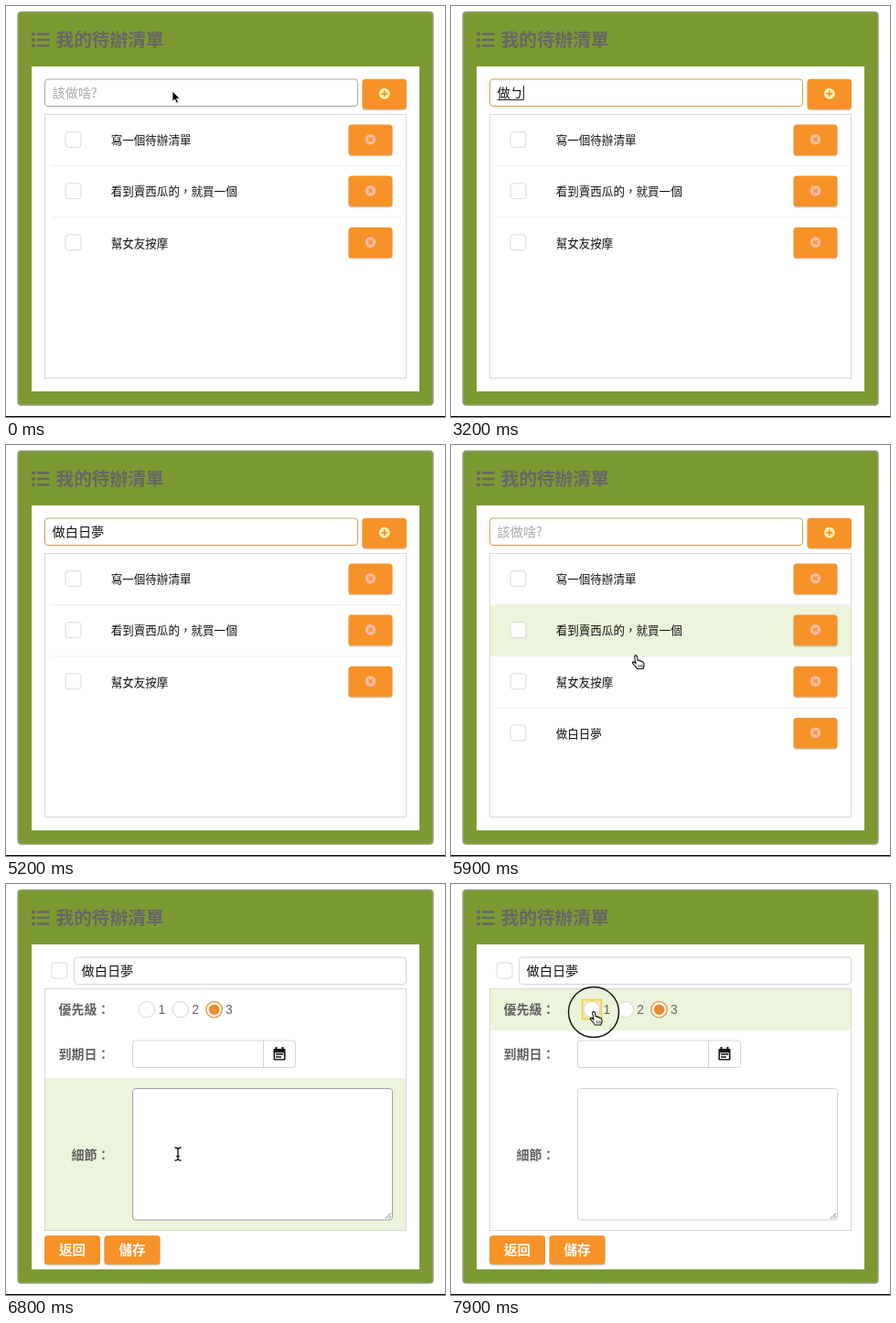
These frames come from a looping animation (480x449 px, 8 s). An HTML page:

```html
<!DOCTYPE html>
<html lang="zh-Hant">
<head>
<meta charset="utf-8">
<style>
html, body { margin: 0; width: 100%; height: 100%; overflow: hidden; background: #fff; }
svg { display: block; width: 480px; height: 449px; }
text { font-family: 'Noto Sans CJK TC', 'Noto Sans CJK', sans-serif; white-space: pre; }
.num { font-family: 'Liberation Sans', sans-serif; font-size: 14px; fill: #666; }
</style>
</head>
<body>
<svg id="stage" viewBox="0 0 480 449"></svg>
<script>
const LOOP = 8000;
const ORANGE = '#f79228', TINT = '#ecf4db';
const SUBMIT = 5400, OPEN = 6450;
const ROW = 56.2;
const TODO = ['寫一個待辦清單', '看到賣西瓜的，就買一個', '幫女友按摩', '做白日夢'];

// [time, committed or composing text]
const KEYS = [
  [1700, ''], [2300, 'ㄗ'], [2500, 'ㄗㄨ'], [2700, 'ㄗㄨㄛ'], [2900, '做'],
  [3200, '做ㄅ'], [3400, '做ㄅㄞ'], [3600, '做白'], [3900, '做白ㄖ'], [4050, '做白日'],
  [4300, '做白日ㄇ'], [4450, '做白日ㄇㄥ'], [4600, '做白日夢'], [4700, '做白日夢']
];
const COMMIT = 4700;

// pointer hot spot: [time, x, y]
const PATH = [
  [0, 182, 93], [5450, 182, 93], [5900, 202, 230.5], [6250, 198, 312],
  [6500, 198, 312], [6780, 188, 295], [7250, 188, 295], [7750, 156, 140]
];
const CLICKS = [[1550, 1800], [6300, 6500], [7800, 8000]];

const rect = (x, y, w, h, fill, stroke = 'none', r = 0, extra = '') =>
  `<rect x="${x}" y="${y}" width="${w}" height="${h}" rx="${r}" fill="${fill}" stroke="${stroke}" ${extra}/>`;
const text = (x, y, size, fill, s, extra = '') =>
  `<text x="${x}" y="${y}" font-size="${size}" fill="${fill}" ${extra}>${s}</text>`;
const circle = (x, y, r, fill, stroke = 'none', w = 1) =>
  `<circle cx="${x}" cy="${y}" r="${r}" fill="${fill}" stroke="${stroke}" stroke-width="${w}"/>`;
const path = (d, stroke, w = 1, fill = 'none') =>
  `<path d="${d}" fill="${fill}" stroke="${stroke}" stroke-width="${w}"/>`;
const group = (id, s) => `<g id="${id}">${s}</g>`;
const bold = 'font-weight="700"';

const button = (x, y, w, h) =>
  rect(x, y + 1.3, w, h, '#000', 'none', 3.5, 'opacity=".2"') + rect(x, y, w, h, ORANGE, 'none', 3.5);
const checkbox = (x, y) => rect(x + .5, y + .5, 17, 17, '#fff', '#d9d9d9', 3.5);

function frame() {
  let s = rect(0, 0, 480, 449, '#fff') + rect(0, 448, 480, 1, '#000');
  s += rect(13, 6.5, 454, 429.5, '#7c9a32', '#98a07c', 3.5, 'stroke-width="1.4"');
  for (const y of [30.5, 37, 43.5])
    s += rect(28, y - 1.7, 4, 3.5, '#666', 'none', 1) + rect(34, y - 1.3, 13.5, 2.6, '#666', 'none', .6);
  return s + text(54.5, 44, 19.7, '#666', '我的待辦清單', bold) + rect(28, 66, 424, 355, '#fff');
}

function listItem(s, i) {
  const y = 118.4 + i * ROW;
  return `<g class="item">` + rect(43, y + .2, 394, ROW, TINT, 'none', 0, 'class="hover"') +
    checkbox(64.5, y + 18.5) + text(114.7, y + 32.7, 12.55, '#111', s) +
    button(374.5, y + 11, 48, 33.5) + circle(398.5, y + 27.3, 5.8, '#f8bba0') +
    path(`M396.4 ${y + 25.2}l4.2 4.2m0 -4.2l-4.2 4.2`, ORANGE, 1.5) + '</g>';
}

function listPage() {
  let s = rect(42.5, 80, 342, 29.5, '#fff', '#a5a5a5', 3.5, 'id="field"');
  s += text(50.5, 100.3, 14.2, '#a9a9a9', '該做啥?', 'id="hint"');
  s += text(50.5, 100.3, 14.2, '#111', '', 'id="typed"');
  s += rect(50.5, 102, 0, 1, '#222', 'none', 0, 'id="under"') + rect(79, 87, 1, 15.5, '#111', 'none', 0, 'id="caret"');
  s += button(389.5, 79.7, 48.5, 33) + circle(413.8, 95.8, 6, '#f6f0ae') +
    path('M410.6 95.8h6.4m-3.2 -3.2v6.4', ORANGE, 1.8);
  s += rect(42.5, 118.5, 395, 288, '#fff', '#d9d9d9');
  s += TODO.map(listItem).join('');
  for (let i = 1; i < 4; i++)
    s += rect(50, 118 + i * ROW, 382, 1, '#eee', 'none', 0, 'class="line"');
  return s;
}

function radio(x, label, on) {
  return circle(x, 137.2, 8.7, '#fff', on ? '#dba050' : '#d5d5d5', on ? 1.4 : 1) +
    (on ? circle(x, 137.2, 5.8, '#f08a2c') : '') +
    `<text class="num" x="${x + 12.4}" y="142">${label}</text>`;
}

function calendar() {
  return rect(292.5, 180, 13, 12.5, '#111', 'none', 1) + rect(294, 184.3, 10, 6.8, '#fff') +
    rect(294.5, 178, 2, 3, '#111') + rect(301.5, 178, 2, 3, '#111') +
    path('M295 186h8.3M295 189h6', '#111', 1.5);
}

function detailPage() {
  const label = (x, y, s) => text(x, y, 14, '#606060', s, bold);
  let s = checkbox(49.5, 85.5) + rect(74.5, 80, 363, 29.5, '#fff', '#d5d5d5', 3.5) +
    text(82.5, 100, 14.2, '#111', TODO[3]);
  s += rect(42.5, 114.5, 395, 264, '#fff', '#d9d9d9');
  s += [[115, 45], [160, 52], [212, 166]].map(([y, h]) =>
    rect(43, y, 394, h, TINT, 'none', 0, 'class="band"')).join('');
  s += label(57.5, 142, '優先級：') + label(57.5, 191, '到期日：') + label(71.5, 300.7, '細節：');
  s += rect(143.5, 126.5, 21, 21, '#f8e9a8', '#f3cc45', 0, 'id="glow" stroke-width="1.6"');
  s += [1, 2, 3].map(n => radio(117.2 + n * 36.8, n, n === 3)).join('');
  s += rect(138.5, 171, 178, 29.5, '#fff', '#d5d5d5', 3) + path('M281.5 171v29.5', '#d5d5d5') + calendar();
  s += rect(138.5, 223.5, 284, 143.5, '#fff', '#d5d5d5', 3, 'id="area"') + path('M415 365.5l6 -6m-2.5 6l2.5 -2.5', '#777');
  s += button(42, 384, 61, 31.5) + button(107.5, 384, 61, 31.5);
  return s + text(58, 405, 14.5, '#fff', '返回', bold) + text(123.5, 405, 14.5, '#fff', '儲存', bold);
}

function pointer() {
  const beam = 'M-3.5 -7Q0 -7 0 -4.5Q0 -7 3.5 -7M0 -5V5M-3.5 7Q0 7 0 4.5Q0 7 3.5 7M-1.8 2.5H1.8';
  const hand = 'M-1.3 1Q-1.3 -.6 0 -.6Q1.3 -.6 1.5 1L2.2 4.8Q3.9 4.2 4.5 5.6Q6.2 4.9 6.8 6.4Q8.6 6 8.9 8' +
    'Q9.6 11 7.8 14H1.6Q.4 11.6 -3.2 8.4Q-4.2 6.6 -2.6 6.4Q-1.5 6.6 -.1 8Z';
  return group('ring', circle(0, 0, 27.5, 'none', '#111', 1.4)) +
    group('arrow', path('M0 0V11.3L2.6 8.9L4.5 13.2L6.5 12.3L4.6 8.2H8Z', '#fff', .8, '#000')) +
    group('beam', path(beam, '#fff', 2.8) + path(beam, '#111', 1.3)) +
    group('hand', path(hand, '#111', 1.1, '#fff') + path('M3.2 9.5v3M5.2 9.5v3M7 9.5v3', '#111', .7));
}

const stage = document.getElementById('stage');
stage.innerHTML = frame() + group('list', listPage()) + group('detail', detailPage()) + group('mouse', pointer());

const el = id => document.getElementById(id);
const all = c => [...stage.querySelectorAll('.' + c)];
const show = (e, on) => e.setAttribute('display', on ? 'inline' : 'none');
const items = all('item'), hovers = all('hover'), lines = all('line'), bands = all('band');

function position(t) {
  let i = PATH.length - 1;
  while (i && PATH[i][0] > t) i--;
  const a = PATH[i], b = PATH[i + 1] || a;
  let k = b === a ? 0 : (t - a[0]) / (b[0] - a[0]);
  k = k * k * (3 - 2 * k);
  return [a[1] + (b[1] - a[1]) * k, a[2] + (b[2] - a[2]) * k];
}

function shape(t, x, y) {
  if (t >= 1800 && t < 5460) return 'none';
  if (t < 700) return 'arrow';
  if (t < OPEN) return y < 110 ? 'beam' : y > 118 ? 'hand' : 'arrow';
  if (y < 160) return 'hand';
  return x > 138 && (y > 223 || y > 171 && y < 201) ? 'beam' : 'arrow';
}

function drawField(t) {
  const focus = t >= KEYS[0][0], key = KEYS.filter(k => k[0] <= t).pop();
  const live = focus && t < SUBMIT, s = live ? key[1] : '';
  el('field').setAttribute('stroke', focus ? '#cda052' : '#a5a5a5');
  if (el('typed').textContent !== s) el('typed').textContent = s;
  show(el('hint'), !s);
  const w = s.length * 14.2;
  el('under').setAttribute('width', t < COMMIT ? w : 0);
  el('caret').setAttribute('x', 50.5 + w);
  const since = live ? t - key[0] : t - SUBMIT;
  show(el('caret'), focus && t < 5850 && since % 1000 < 500);
}

function draw(t) {
  const [x, y] = position(t), detail = t >= OPEN, count = t < SUBMIT ? 3 : 4;
  show(el('list'), !detail);
  show(el('detail'), detail);
  drawField(t);
  items.forEach((e, i) => show(e, i < count));
  lines.forEach((e, i) => show(e, i + 1 < count));
  const over = Math.floor((y - 118.4) / ROW);
  hovers.forEach((e, i) => show(e, i === over));
  const band = y < 115 ? -1 : y < 160 ? 0 : y < 212 ? 1 : 2;
  bands.forEach((e, i) => show(e, i === band));
  el('area').setAttribute('stroke', band === 2 ? '#a0a0a0' : '#d5d5d5');
  show(el('glow'), t >= 7850);
  const kind = shape(t, x, y);
  for (const k of ['arrow', 'beam', 'hand']) show(el(k), k === kind);
  show(el('ring'), CLICKS.some(([a, b]) => t >= a && t < b));
  el('mouse').setAttribute('transform', `translate(${x.toFixed(2)} ${y.toFixed(2)})`);
}

const start = performance.now();
function tick(now) {
  draw(Math.max(0, now - start) % LOOP);
  requestAnimationFrame(tick);
}
draw(0);
requestAnimationFrame(tick);
</script>
</body>
</html>
```
